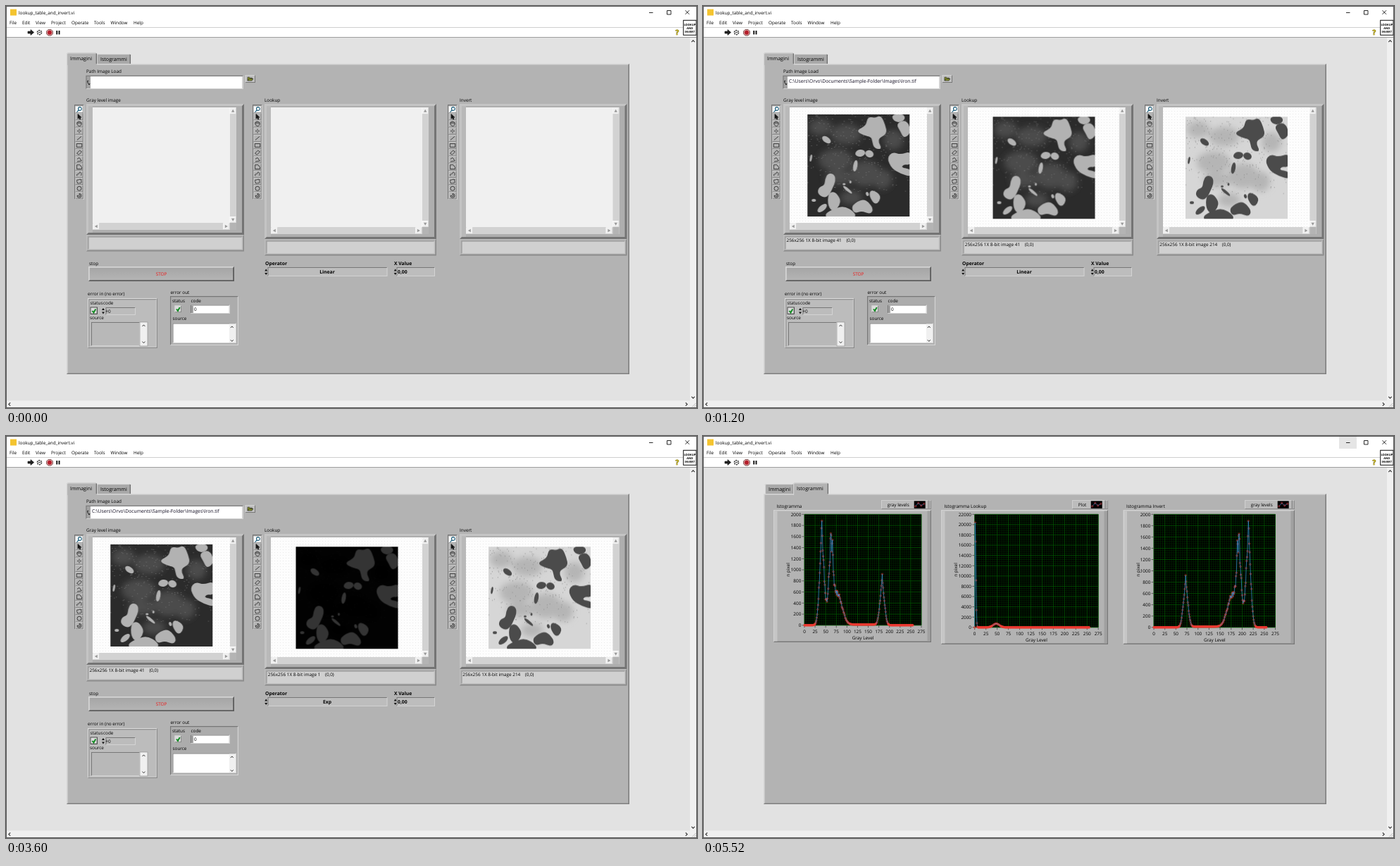
An HTML page that plays this animation: 981 px wide and 571 px high, repeating every 6000 ms.

```html
<!DOCTYPE html>
<html lang="it">
<head>
<meta charset="utf-8">
<title>Lookup table</title>
<style>
html, body { margin: 0; width: 100%; height: 100%; overflow: hidden; background: #e2e2e2; }
svg { display: block; }
#stage { width: 100%; height: 100%; }
text { font: 6.4px "Open Sans", "Noto Sans", sans-serif; white-space: pre; text-rendering: geometricPrecision; }
.tab { font-size: 7.1px; }
.bold { font-size: 6.8px; font-weight: 700; }
.file { font-size: 6.8px; }
.tiny { font-size: 4px; font-weight: 700; }
.mid { text-anchor: middle; }
.end { text-anchor: end; }
.step { animation: 6s step-end infinite; }
.front { animation-name: front; }
.loaded { animation-name: loaded; }
.linear { animation-name: linear; }
.linear-value { animation-name: linear-value; }
.menu { animation-name: menu; }
.exp { animation-name: exp; }
.charts { animation-name: charts; }
@keyframes front { 0% { opacity: 1 } 80%, 100% { opacity: 0 } }
@keyframes loaded { 0% { opacity: 0 } 20% { opacity: 1 } 80%, 100% { opacity: 0 } }
@keyframes linear { 0% { opacity: 0 } 20% { opacity: 1 } 60%, 100% { opacity: 0 } }
@keyframes linear-value { 0% { opacity: 1 } 60%, 100% { opacity: 0 } }
@keyframes menu { 0% { opacity: 0 } 40% { opacity: 1 } 60%, 100% { opacity: 0 } }
@keyframes exp { 0% { opacity: 0 } 60% { opacity: 1 } 80%, 100% { opacity: 0 } }
@keyframes charts { 0% { opacity: 0 } 80%, 100% { opacity: 1 } }
</style>
</head>
<body>
<svg id="stage" viewBox="0 0 981 571" preserveAspectRatio="none"></svg>
<script>
const PANEL = '#b3b3b3', LIGHT = '#d3d3d3', DARK = '#777';

const rect = (x, y, w, h, fill, more = '') =>
  `<rect x="${x}" y="${y}" width="${w}" height="${h}" fill="${fill}" ${more}/>`;
const path = (d, stroke = '#111', width = 1, fill = 'none') =>
  `<path d="${d}" stroke="${stroke}" stroke-width="${width}" fill="${fill}"/>`;
const text = (x, y, s, cls = '', more = '') =>
  `<text x="${x}" y="${y}" class="${cls}" ${more}>${s}</text>`;
const step = (name, ...parts) => `<g class="step ${name}">${parts.join('')}</g>`;
const at = (x, y, s) => `<g transform="translate(${x} ${y})">${s}</g>`;
const list = (n, make) => Array.from({ length: n }, (_, i) => make(i));
const noise = i => { const v = Math.sin(i * 12.9898 + 4.1) * 43758.5453; return v - Math.floor(v); };

// Raised box; swap light and dark for a sunken one
function bevel(x, y, w, h, fill, t = 1, light = LIGHT, dark = DARK) {
  const r = x + w, b = y + h;
  return rect(x, y, w, h, fill) +
    path(`M${x} ${b}V${y}H${r}l${-t} ${t}H${x + t}V${b - t}Z`, 'none', 0, light) +
    path(`M${r} ${y}V${b}H${x}l${t} ${-t}H${r - t}V${y + t}Z`, 'none', 0, dark);
}
const sunken = (x, y, w, h, fill, t = 1) => bevel(x, y, w, h, fill, t, DARK, LIGHT);

// dir: 0 up, 90 right, 180 down, 270 left
const chevron = (x, y, dir, s = 1) =>
  `<path transform="translate(${x} ${y}) rotate(${dir}) scale(${s})" d="M-2.2 1.2L0-1.2L2.2 1.2" fill="none" stroke="#333" stroke-width="1.1"/>`;
const scrollButton = (x, y, dir) =>
  bevel(x - 4.5, y - 4.5, 9, 9, '#f0f0f0', .5, '#fff', '#c8c8c8') +
  `<path transform="translate(${x} ${y}) rotate(${dir})" d="M-2.2 1.8L0-2.2L2.2 1.8Z" fill="#999"/>`;
const spinner = (x, y) => path(`M${x - 2} ${y - 1.2}h4l-2-3zM${x - 2} ${y + 1.2}h4l-2 3z`, 'none', 0, '#111');

function windowFrame() {
  const menus = [[5, 'File'], [23, 'Edit'], [42, 'View'], [64, 'Project'], [93, 'Operate'],
    [125, 'Tools'], [148.5, 'Window'], [181, 'Help']];
  return rect(0, 0, 981, 571, '#e2e2e2') + rect(0, 0, 981, 44, '#fff') +
    rect(0, 30, 961, .6, '#b0b0b0') + rect(0, 44, 981, .8, '#8c8c8c') +
    rect(6, 4.5, 9, 9, '#f4c430') +
    text(18, 12, 'lookup_table_and_invert.vi') +
    menus.map(([x, s]) => text(x, 26, s)).join('') +
    step('charts', rect(903, 1, 25, 17, '#e5e5e5')) +
    path('M913 9.5h5.5M938.5 6.5h5.5v5.5h-5.5zM964.5 6.2l5.6 5.6m0-5.6l-5.6 5.6', '#111', .9) +
    path('M31 36h4v-2.4l4.6 3.9l-4.6 3.9v-2.4h-4z', '#111', .6, '#222') +
    `<circle cx="47.5" cy="37.6" r="3" fill="none" stroke="#333" stroke-width="1.6" stroke-dasharray="2 1.1"/>` +
    path('M46 37.6h3', '#333', .9) +
    path('M60 33.4h4l2.4 2.4v3.8l-2.4 2.4h-4l-2.4-2.4v-3.8z', '#5a2020', .7, '#d9a0a0') +
    `<circle cx="62" cy="37.7" r="2.9" fill="#b51c2a"/>` +
    rect(71.3, 35, 1.9, 5.4, '#111') + rect(74.6, 35, 1.9, 5.4, '#111') +
    `<text x="953" y="41" class="mid" style="font-size:10px;font-weight:700" fill="#f5dc00" stroke="#554a00" stroke-width=".5">?</text>` +
    rect(961.7, 20.3, 18.3, 21, '#fff', 'stroke="#111"') +
    ['LOOKUP', 'AND', 'INVERT'].map((s, i) => text(970.8, 28 + i * 4.9, s, 'tiny mid')).join('') +
    rect(971, 45, 9, 525, '#f0f0f0') + rect(1, 560.5, 979, 9.5, '#f0f0f0') +
    chevron(975.5, 50, 0) + chevron(975.5, 556, 180) + chevron(5, 565.7, 270) + chevron(966, 565.7, 90) +
    path('M974 569.5l5.5-5.5M977 569.5l2.5-2.5', '#b0b0b0', .8) +
    bevel(86, 82, 799, 441, PANEL, 1.6, '#d6d6d6', '#808080');
}

function tab(x, w, label, on) {
  const y = on ? 66.5 : 68, b = on ? 84 : 82, r = x + w;
  return path(`M${x} ${b}V${y + 1.5}l1.5-1.5H${r - 1.5}l1.5 1.5V${b}Z`, 'none', 0, on ? PANEL : '#a9a9a9') +
    path(`M${x + .6} ${b}V${y + 1.5}l1.2-1H${r - 1.5}`, '#d6d6d6', 1.1) +
    path(`M${r - .6} ${y + 1}V82`, '#6c6c6c', 1.3) +
    text(x + 5, on ? 76.6 : 77.6, label, 'tab');
}

const TOOLS = [
  'M3.3-1A2.4 2.4 0 1 1-1.5-1A2.4 2.4 0 1 1 3.3-1M-.8 1L-3.5 3.7',
  'M-2-3.7V3L-.5 1.6L.8 4L2 3.4L.9 1H3Z',
  'M-3.2 0C-4-2-2-3-2-1.5C-2-4 0-4 0-2.5C1-4 2-3 2-2C4-2 3 0 3 1C2 4-2 4-3.2 0M-2-1.5V.3M0-2.5V0M2-2V.3',
  'M-3 0H-1M1 0H3M0-3V-1M0 1V3M-.4 0H.4',
  'M-3 2.5L3-2.5',
  'M-3.7-2.4h7.4v4.8h-7.4z',
  'M-3.5 1L.7-3L3.5-1L-.7 3Z',
  'M-3-1L0-3L3.3 1.6L-3 2.6',
  'M-3.4-3H1L3.5 .6V3H-3.4Z',
  'M-3 2.6C-5-2 0 1.5 0-1.5S4.5-2 2.5 2',
  'M-3-2C-1-1 0-4 3-2.4C2 0 4.5 2 2 2.4C0 2-1 4-3 2.2C-2 1-4.6 0-3-2Z',
  'M3 0A3 3 0 1 1-3 0A3 3 0 1 1 3 0',
  'M0-3A3 3 0 1 1-3 0L-1 0A1.2 1.2 0 1 0 0-1.2Z'
];
const palette = x => sunken(x, 140, 14, 135, '#999') + TOOLS.map((d, i) => {
  const y = 147 + i * 10.2;
  return bevel(x + 1.5, y - 4.8, 11, 9.7, i ? PANEL : '#fff', .7) +
    at(x + 7, y, path(d, i ? '#222' : '#175a78', i ? .8 : 1.1, i === 1 ? '#111' : 'none'));
}).join('');

function display(x, w, h, label) {
  const y = 139, ix = x + 9, r = x + w - 11, b = y + h - 7, sy = y + h;
  return text(x, 136.4, label) + palette(x - 17) +
    bevel(x, y, w, h, '#aeaeae', 3, '#c4c4c4', '#747474') +
    rect(x + 3, y + 3, 6, h - 6, '#b9b9b9') +
    rect(ix, 144, r - ix, b - 144, '#f0f0f0') +
    step('loaded', rect(ix, 144, r - ix - 9, b - 154, 'url(#dots)')) +
    rect(r - 9, 144, 9, b - 144, '#d2d2d2') + rect(ix, b - 10, r - ix - 9, 10, '#d2d2d2') +
    rect(r - 9, b - 10, 9, 10, '#b4b4b4') +
    scrollButton(r - 4.8, 149, 0) + scrollButton(r - 4.8, b - 14.5, 180) +
    scrollButton(ix + 5, b - 5, 270) + scrollButton(r - 14.3, b - 5, 90) +
    bevel(x, sy, w, 23.5, '#a9a9a9', 1.5, '#bdbdbd', '#8c8c8c') +
    bevel(x + 2.5, sy + 2.5, w - 5, 18.5, '#d0d0d0', 1, '#8c8c8c', '#c4c4c4');
}
const status = (x, y, level) => text(x, y, `256x256 1X 8-bit image ${level}    (0,0)`);

// Soft stand-in for the metal picture, 145 units square
const GRAINS = [
  '70 23 84 17 86 4 96 6 104 2 110 16 112 27 101 33 100 40 105 49 95 47 93 38 91 31 80 29',
  '121 1 136 0 138 7 129 11 122 7',
  '127 14 136 9 143 13 146 26 137 33 133 24',
  '114 62 121 54 132 58 147 53 147 71 136 70 132 76 147 79 147 88 132 83 120 76',
  '26 92 30 84 38 86 39 95 35 104 31 113 24 118 15 112 17 104 25 101',
  '30 113 38 110 46 120 45 129 37 138 30 130',
  '63 131 74 123 83 122 93 134 89 141 77 136 67 140',
  '91 107 105 116 97 129 88 115',
  '26 141 40 134 52 131 66 139 68 147 28 147'
];
const SPOTS = [[27, 36, 7, 4, 35], [75, 55, 7, 5, -10], [88, 56, 6, 5, 20], [68, 73, 3, 8, 10],
  [5, 62, 1.5, 5, 10], [21, 133, 8, 4, -40], [9, 122, 3, 2, 0], [52, 99, 2, 1.5, 0],
  [61, 96, 1.5, 2, 0], [57, 107, 8, 2, 40], [85, 113, 2, 3, -20]];
const PATCHES = [[40, 65, 24, 16], [55, 28, 22, 14], [82, 84, 22, 18], [106, 92, 14, 14],
  [18, 18, 16, 12], [122, 36, 14, 14], [45, 90, 20, 10], [62, 118, 16, 10]];
const ellipse = ([x, y, rx, ry, turn = 0]) =>
  `<ellipse rx="${rx}" ry="${ry}" transform="translate(${x} ${y}) rotate(${turn})"/>`;
const SPECKLE = list(280, i => `M${(noise(i) * 145).toFixed(1)} ${(noise(i + 500) * 110).toFixed(1)}h.9`).join('');

// Closed curve through the middles of a polygon's sides
function blob(points) {
  const n = points.split(' ').map(Number), count = n.length / 2;
  const point = i => [n[i % count * 2], n[i % count * 2 + 1]];
  const middle = i => point(i).map((v, k) => (v + point(i + 1)[k]) / 2);
  return `<path d="M${middle(0)}${list(count, i => `Q${point(i + 1)} ${middle(i + 1)}`).join('')}Z"/>`;
}

const metal = (x, y, base, patch, speck, grain) =>
  `<svg x="${x}" y="${y}" width="145" height="145">` + rect(0, 0, 145, 145, base) +
  `<g fill="${patch}" filter="url(#soft)">${PATCHES.map(ellipse).join('')}</g>` +
  path(SPECKLE, speck, .9) +
  `<g fill="${grain}" stroke="${grain}" stroke-width="1.8">${GRAINS.map(blob).join('')}</g>` +
  `<g fill="${grain}">${SPOTS.map(ellipse).join('')}</g></svg>`;

const led = (x, y) => bevel(x, y, 9.5, 9.5, '#dcdcdc', .8) +
  path(`M${x + 2.5} ${y + 5}l2 2.5l2.8-5`, '#0d8a1e', 1.9);

function errorClusters() {
  return text(116, 410.6, 'error in (no error)') +
    bevel(116, 415, 99, 71, '#b0b0b0', 1, '#dedede', '#8a8a8a') +
    sunken(117.5, 416.5, 96, 68, '#bcbcbc', .7) +
    text(119.5, 424.2, 'status') + text(138, 424.2, 'code') + led(120, 428) +
    rect(120, 428, 9.5, 9.5, 'none', 'stroke="#333" stroke-width=".8"') +
    spinner(138, 433.3) + sunken(141.5, 428, 42.5, 11, '#bcbcbc') +
    path('M141.5 433.5h3m-1.5-2v4', '#333', .7) + text(145, 435.7, '0') +
    text(119, 445, 'source') + sunken(121, 449, 69, 34, '#b8b8b8') +
    rect(190, 449, 11, 34, '#f0f0f0', 'stroke="#888" stroke-width=".6"') +
    chevron(195.5, 454, 0, .9) + chevron(195.5, 477.7, 180, .9) +
    text(233.5, 409.3, 'error out') +
    sunken(233, 412, 97, 70, '#acacac', 1.2) +
    text(236, 421.4, 'status') + text(262.5, 421.2, 'code') + led(239.5, 425.5) +
    sunken(262, 424.5, 55.5, 12.5, '#fff') + rect(263, 425.5, 3, 10.5, '#a0a0a0') + text(267, 433.2, '0') +
    text(236.5, 446.3, 'source') + sunken(236.5, 450.5, 90, 28.5, '#fff') +
    rect(317, 451.5, 9, 26.5, '#f0f0f0') + chevron(320.8, 456, 0, .9) + chevron(320.8, 475.3, 180, .9);
}

function dropdown() {
  const items = ['Linear', 'Log', 'Exp', 'Square', 'Square root', 'Power X', 'Power 1/X'];
  return rect(374, 372, 169, 85, '#000', 'opacity=".35"') +
    rect(372.4, 370.4, 168.6, 84.6, '#f2f2f2', 'stroke="#999" stroke-width=".8"') +
    rect(373, 394, 166.5, 12, '#0078d7') +
    path('M376 377.3l1.6 1.8l2.6-4.2', '#111', .9) +
    items.map((s, i) => text(384, 378.9 + i * 11.9, s, 'bold', i === 2 ? 'fill="#fff"' : '')).join('');
}

function imagesPage() {
  return tab(129, 48, 'Istogrammi', false) + tab(86, 43, 'Immagini', true) +
    text(114, 95.2, 'Path Image Load') +
    sunken(113.5, 98.7, 223.5, 19.3, '#a2a2a2') + rect(120, 100, 215.5, 17, '#fff') +
    path('M115.5 107l1.6-1.2M117 111.5l2.4-1M116 106v3l2.5 3', '#111', .9) +
    step('loaded', text(122, 109.3, 'C:\\Users\\Orvo\\Documents\\Sample-Folder\\Images\\Iron.tif', 'file', 'fill="#100c20"')) +
    bevel(339.5, 98, 14.5, 11, '#c0c0c0') +
    path('M343 106v-4.8h2.6l.8 1h3v1.2M343 106l1.8-2.6h6l-1.8 2.6z', '#222', .7, '#8f9a2c') +
    display(114, 224, 186, 'Gray level image') +
    display(367, 244, 192, 'Lookup') +
    display(644, 237.5, 192, 'Invert') +
    step('loaded',
      metal(148.3, 154, '#2b2b2b', '#4c4c4c', '#808080', '#b2b2b2'),
      metal(685, 157.3, '#d6d6d6', '#b5b5b5', '#808080', '#4b4b4b'),
      status(118.5, 334.8, 41), status(648.3, 341.3, 214)) +
    step('linear', metal(411.5, 157.3, '#2b2b2b', '#4c4c4c', '#808080', '#b2b2b2'), status(371.8, 341.3, 41)) +
    step('exp', metal(411.5, 157.3, '#020202', '#040404', '#0b0b0b', '#343434'), status(371.8, 341.3, 1)) +
    text(118, 368.2, 'stop') + bevel(117, 370, 207, 21, 'url(#button)', 1.8, '#d4d4d4', '#5c5c5c') +
    text(220.5, 383.2, 'STOP', 'mid', 'fill="#f01818"') +
    errorClusters() +
    text(368, 367.6, 'Operator', 'bold') + spinner(369.2, 377.7) +
    sunken(371.5, 371, 170, 13, '#bdbdbd') +
    step('linear-value', text(456, 380, 'Linear', 'bold mid')) +
    step('exp', text(456, 380, 'Exp', 'bold mid')) +
    text(551, 367.6, 'X Value', 'bold') + spinner(552.7, 377.7) +
    sunken(554.5, 371, 54.5, 13, '#bdbdbd') + text(556, 380, '0,00', 'bold') +
    step('menu', dropdown());
}

const bell = (g, top, mean, width) => top * Math.exp(-((g - mean) ** 2) / (2 * width * width));
function grayCount(g) {
  const v = bell(g, 1450, 41, 5.5) + bell(g, 430, 41, 1) + bell(g, 1080, 62, 5.5) + bell(g, 400, 62, 1) +
    bell(g, 370, 66, 1) + bell(g, 550, 78, 10.5) + bell(g, 720, 183, 5.3) + bell(g, 200, 183, 1);
  const floor = g > 90 && g < 175 ? 13 : 1;
  return floor + v * (g === 41 || g === 62 || g === 183 ? 1 : 1 + (noise(g) - .5) * .16);
}
const expCount = g => (g ? bell(g, 20400, 1, 1.58) : 0) + bell(g, 720, 48, 7);

function chart({ x, w, h, px, pw, ph, max, by, title, legend, lw, count }) {
  const top = 111.3, base = top + ph, right = x + w;
  const sx = g => px + g * pw / 275, sy = v => base - v * ph / max;
  const rows = max / by;
  const grid = (nx, ny, color) => path(
    list(nx + 1, i => `M${px + i * pw / nx} ${top}v${ph}`).join('') +
    list(ny + 1, i => `M${px} ${top + i * ph / ny}h${pw}`).join(''), color, .6);
  const points = list(256, g => [sx(g).toFixed(2), sy(count(g)).toFixed(2)]);
  const dot = ([a, b]) => `M${a - 1.15} ${b}a1.15 1.15 0 1 0 2.3 0a1.15 1.15 0 1 0-2.3 0`;
  const swatch = [[2, 7.5], [6, 3], [10, 6.5], [14, 4]];
  return text(x + 4.5, 102, title) +
    bevel(right - lw, 91, lw, 13, '#bcbcbc', 1, '#d0d0d0', '#8a8a8a') +
    rect(right - 5, 91.5, 3, 12, '#9c9c9c') +
    text(right - lw + 8.8, 99.8, legend) + rect(right - 24.3, 92.3, 16, 10.5, '#000') +
    at(right - 24.3, 92.3, path('M' + swatch.join('L'), '#3a96dc', .7) + path(swatch.map(dot).join(''), '#e33', .6)) +
    bevel(x, 105, w, h, PANEL, 1.5, '#d2d2d2', '#787878') +
    rect(x + 1.5, 106.5, 4, h - 3, '#c6c6c6') + rect(right - 5.5, 106.5, 4, h - 3, '#a0a0a0') +
    rect(px, top, pw, ph, '#000') + grid(55, rows * 5, '#002a00') + grid(11, rows, '#006200') +
    list(rows + 1, i => path(`M${px - 3.5} ${sy(i * by)}h3`, '#222', .6) +
      text(px - 4.7, sy(i * by) + 2.3, i * by, 'end')).join('') +
    list(12, i => path(`M${sx(i * 25)} ${base + .5}v3`, '#222', .6) +
      text(sx(i * 25), base + 10.8, i * 25, 'mid')).join('') +
    text(px + pw / 2, base + 20.3, 'Gray Level', 'mid') +
    text(0, 0, 'n pixel', 'mid', `transform="translate(${x + 23} 190) rotate(-90)"`) +
    path(points.map(dot).join(''), '#ee3a30', .6) + path('M' + points.join('L'), '#3a96dc', .7) +
    path(points.filter(p => p[1] > base - 2).map(dot).join(''), '#ee3a30', .6);
}

function chartsPage() {
  return tab(88, 41, 'Immagini', false) + tab(128, 50, 'Istogrammi', true) +
    chart({ x: 100, w: 224, h: 188, px: 144, pw: 166, ph: 157.5, max: 2000, by: 200,
      title: 'Istogramma', legend: 'gray levels', lw: 71, count: grayCount }) +
    chart({ x: 338, w: 237, h: 191, px: 385.7, pw: 175.5, ph: 160.5, max: 22000, by: 2000,
      title: 'Istogramma Lookup', legend: 'Plot', lw: 51, count: expCount }) +
    chart({ x: 596.5, w: 243.5, h: 191, px: 640, pw: 172.5, ph: 160.5, max: 2000, by: 200,
      title: 'Istogramma Invert', legend: 'gray levels', lw: 71, count: g => grayCount(255 - g) });
}

document.getElementById('stage').innerHTML =
  `<defs><pattern id="dots" width="4" height="4" patternUnits="userSpaceOnUse">` +
  rect(0, 0, 4, 4, '#fdfdfd') + rect(1, 1, 1, 1, '#e9e9e9') + `</pattern>` +
  `<linearGradient id="button" x2="0" y2="1"><stop stop-color="#a4a4a4"/><stop offset="1" stop-color="#b6b6b6"/></linearGradient>` +
  `<filter id="soft" x="-20%" y="-20%" width="140%" height="140%"><feGaussianBlur stdDeviation="5"/></filter></defs>` +
  windowFrame() + step('front', imagesPage()) + step('charts', chartsPage()) +
  rect(.5, .5, 980, 570, 'none', 'stroke="#5a5a5a"');
</script>
</body>
</html>
```
